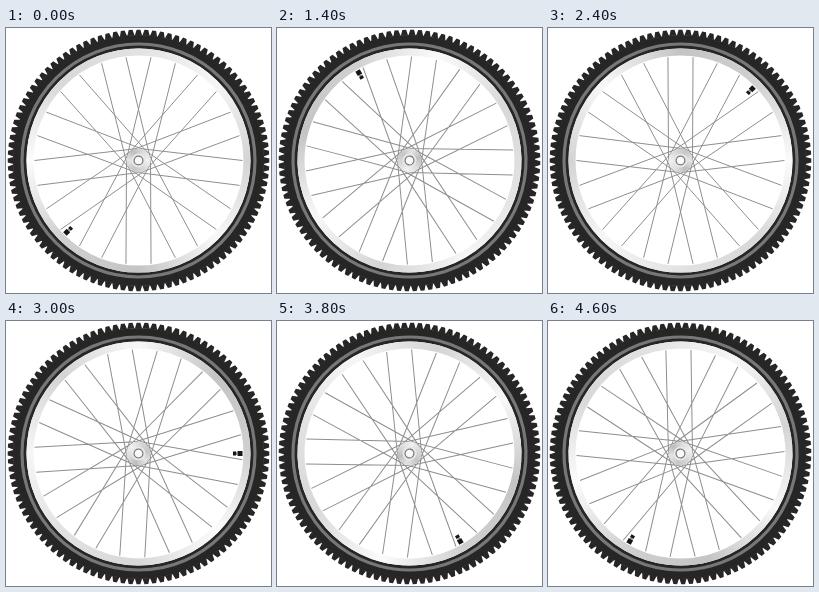
An HTML page with a canvas for the animation above (4.8 s loop, 265 px wide and 265 px high).

```html
<!DOCTYPE html>
<html lang="en">
<head>
<meta charset="utf-8">
<title>Bicycle wheel</title>
<style>
  html, body { margin: 0; width: 100%; height: 100%; overflow: hidden; background: #fff; }
  canvas { display: block; width: 265px; height: 265px; }
</style>
</head>
<body>
<canvas id="stage" width="265" height="265"></canvas>
<script>
const ctx = document.getElementById('stage').getContext('2d');
const TAU = Math.PI * 2;
const CENTER = 132.5;
const STEPS = 24, STEP_MS = 200;
const KNOBS = 104, SPOKES = 26;

function ring(radius, width, color) {
  ctx.beginPath();
  ctx.arc(0, 0, radius, 0, TAU);
  ctx.lineWidth = width;
  ctx.strokeStyle = color;
  ctx.stroke();
}

function disc(radius, color) {
  ctx.beginPath();
  ctx.arc(0, 0, radius, 0, TAU);
  ctx.fillStyle = color;
  ctx.fill();
}

function conic(stops) {
  const g = ctx.createConicGradient(0, 0, 0);
  stops.forEach((c, i) => g.addColorStop(i / (stops.length - 1), c));
  return g;
}

// Evenly spaced shades, clockwise from the right.
const rimShade = conic(['#d4d4d4', '#f8f8f8', '#c4c4c4', '#d0d0d0', '#fbfbfb', '#d8d8d8', '#e2e2e2', '#f6f6f6', '#d4d4d4']);
const hubShade = conic(['#f0f0f0', '#d8d8d8', '#c6c6c6', '#e4e4e4', '#bebebe', '#dedede', '#f0f0f0']);

function drawTire() {
  ctx.fillStyle = '#262626';
  ctx.beginPath();
  for (let i = 0; i < KNOBS; i++) {
    const a = i / KNOBS * TAU, pitch = TAU / KNOBS;
    [[125, -0.48], [130.8, -0.24], [130.8, 0.24], [125, 0.48]].forEach(([r, k], j) => {
      const x = r * Math.cos(a + k * pitch), y = r * Math.sin(a + k * pitch);
      j ? ctx.lineTo(x, y) : ctx.moveTo(x, y);
    });
    ctx.closePath();
  }
  ctx.fill();
  ring(118.8, 13.6, '#262626');
  ring(116.5, 3.2, '#777');
}

function drawRim() {
  ring(108.5, 7, rimShade);
}

// Spokes leave the hub flange on alternating tangents.
function drawSpokes() {
  ctx.strokeStyle = '#8e8e8e';
  ctx.lineWidth = 1;
  ctx.beginPath();
  for (let i = 0; i < SPOKES; i++) {
    const a = i / SPOKES * TAU;
    const flange = a + (i % 2 ? 1 : -1) * 1.45;
    ctx.moveTo(12 * Math.cos(flange), 12 * Math.sin(flange));
    ctx.lineTo(104 * Math.cos(a), 104 * Math.sin(a));
  }
  ctx.stroke();
}

function drawHub() {
  disc(12, hubShade);
  disc(7, '#e8e8e8');
  ring(4.4, 1.3, '#7c7c7c');
  disc(3.6, '#fafafa');
}

function drawValve() {
  ctx.save();
  ctx.rotate(TAU * 3 / 8);
  ctx.fillStyle = '#161616';
  ctx.fillRect(99, -2.5, 5, 5);
  ctx.fillRect(94.5, -2, 3, 4);
  ctx.fillStyle = '#888';
  ctx.fillRect(97.5, -1.5, 1.5, 3);
  ctx.restore();
}

function drawWheel(step) {
  ctx.clearRect(0, 0, 265, 265);
  ctx.save();
  ctx.translate(CENTER, CENTER);
  ctx.rotate(step / STEPS * TAU);
  drawTire();
  drawRim();
  drawSpokes();
  drawHub();
  drawValve();
  ctx.restore();
}

const start = performance.now();
function tick() {
  const elapsed = performance.now() - start;
  drawWheel(Math.floor(elapsed / STEP_MS) % STEPS);
  requestAnimationFrame(tick);
}
tick();
</script>
</body>
</html>
```
